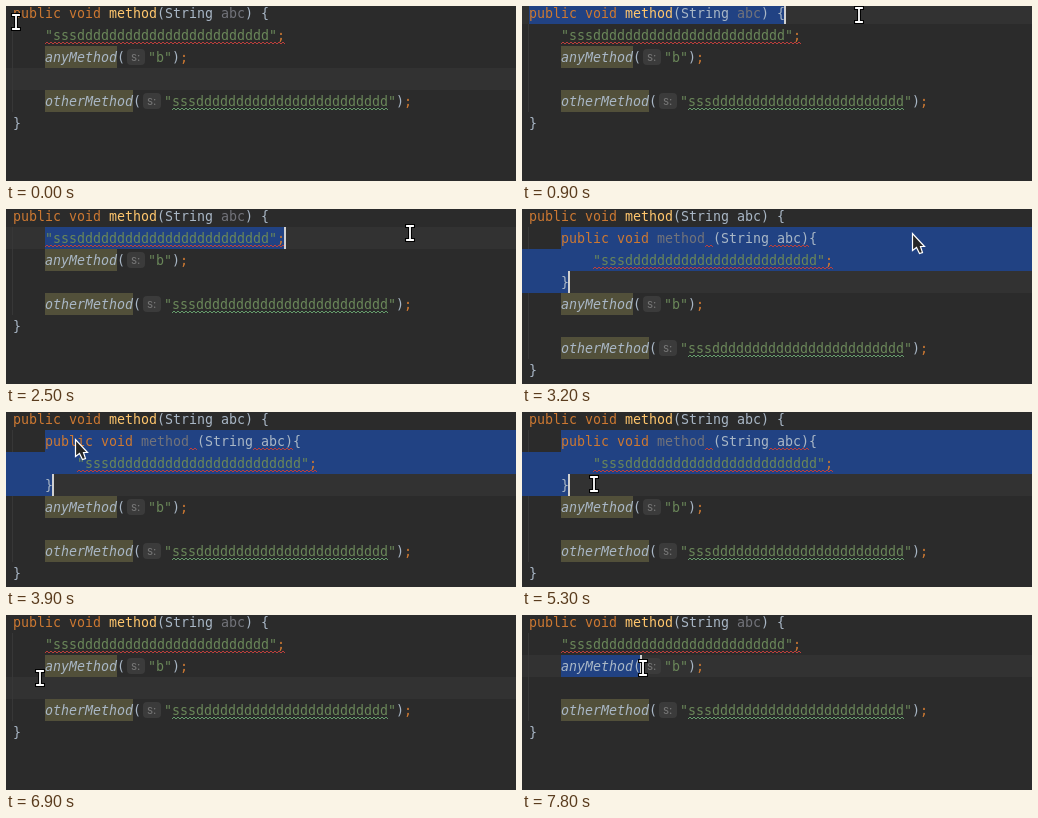
Write an HTML page with a canvas that moves like this. It is 510 by 175 pixels and loops after 8000 ms.

```html
<!DOCTYPE html>
<html lang="en">
<head>
<meta charset="utf-8">
<title>Editor selection</title>
<style>
html, body { margin: 0; width: 100%; height: 100%; overflow: hidden; background: #2b2b2b; }
canvas { display: block; }
</style>
</head>
<body>
<canvas id="stage" width="510" height="175"></canvas>
<script type="module">
const ctx = document.getElementById("stage").getContext("2d");
const W = 510, H = 175, LOOP = 8000, STEP = 100;
const ROW = 22, CH = 8, LEFT = 7, INDENT = 39;
const C = {
  bg: "#2b2b2b", line: "#323232", guide: "#373737", sel: "#214283", used: "#52503a",
  text: "#a9b7c6", key: "#cc7832", name: "#ffc66d", str: "#6a8759",
  dim: "#72737a", red: "#bc3f3c", typo: "#659c6b", pill: "#3b3b3b", hint: "#787878"
};
const STR = "sss" + "d".repeat(24);
const ARROW = new Path2D("M.5 .5v17l4-3 3 6 3-1-2-6h4z");
const BEAM = new Path2D("M-3 -7h6M0 -7v14M-3 7h6");

// Mouse moves: start, end, target x and y; it rests in between
const MOVES = [
  [100, 200, 5, 10], [300, 900, 337, 9], [900, 1200, 225, 27], [1200, 1800, 38, 27],
  [1900, 2500, 404, 24], [3100, 3900, 69, 27], [3900, 4400, 102, 45], [4400, 5000, 44, 72],
  [5100, 5500, 100, 72], [5800, 6700, 28, 78], [6700, 7100, 40, 48],
  [7100, 7400, 173, 53], [7400, 7700, 121, 53]
];

const rowTop = row => row * ROW - 4;
const clamp = (v, lo, hi) => Math.min(hi, Math.max(lo, v));
const snap = (x, from) => from + Math.round((x - from) / CH) * CH;

function mouseAt(t) {
  let x = 10, y = 16;
  for (const [start, end, toX, toY] of MOVES) {
    const p = clamp((t - start) / (end - start), 0, 1);
    const k = p * p * (3 - 2 * p);
    x += (toX - x) * k;
    y += (toY - y) * k;
  }
  return [x, y];
}

function fill(color, x0, x1, row) {
  ctx.fillStyle = color;
  ctx.fillRect(x0, rowTop(row), x1 - x0, ROW);
}

// Draws [text, colour] spans in a row and returns the x after the last one
function write(x, row, spans, style = "") {
  ctx.font = style + " 13.29px 'DejaVu Sans Mono', monospace";
  for (const [text, color] of spans) {
    ctx.fillStyle = color;
    ctx.fillText(text, x, rowTop(row) + 16);
    x += text.length * CH;
  }
  return x;
}

function wave(x0, x1, row, color) {
  const y = rowTop(row) + 19;
  ctx.beginPath();
  for (let x = x0, up = 1; x <= x1; x += 2, up = -up) ctx.lineTo(x, y + up);
  ctx.strokeStyle = color;
  ctx.lineWidth = 1;
  ctx.stroke();
}

function statement(x, row) {
  const end = write(x, row, [[`"${STR}"`, C.str], [";", C.key]]);
  wave(x, end, row, C.red);
}

// Draws a call with its parameter hint and returns the x of the argument
function call(method, arg, row) {
  const paren = INDENT + method.length * CH;
  write(INDENT, row, [[method, C.text]], "italic");
  const x = write(paren, row, [["(", C.text]]);
  ctx.fillStyle = C.pill;
  ctx.beginPath();
  ctx.roundRect(x + 2, rowTop(row) + 3, 18, 16, 4);
  ctx.fill();
  ctx.font = "11.5px Inter, sans-serif";
  ctx.fillStyle = C.hint;
  ctx.fillText("s:", x + 6, rowTop(row) + 15);
  write(x + 23, row, [[`"${arg}"`, C.str], [")", C.text], [";", C.key]]);
  return x + 23;
}

function pointer(x, y, isArrow) {
  ctx.save();
  ctx.translate(Math.round(x), Math.round(y));
  if (isArrow) {
    ctx.fillStyle = "#262626";
    ctx.fill(ARROW);
    ctx.strokeStyle = "#fff";
    ctx.lineWidth = 1.2;
    ctx.stroke(ARROW);
  } else {
    ctx.lineCap = "square";
    for (const [color, width] of [["#000", 4], ["#fff", 1.8]]) {
      ctx.strokeStyle = color;
      ctx.lineWidth = width;
      ctx.stroke(BEAM);
    }
  }
  ctx.restore();
}

// Row and span selected by dragging the mouse to x
function selection(t, x) {
  if (t < 400) return null;
  if (t < 2000) return [0, LEFT, t < 900 ? clamp(snap(x, LEFT), LEFT, 263) : 263];
  if (t < 3200) return [1, INDENT, clamp(snap(x, INDENT), INDENT, 279)];
  if (t < 7100) return null;
  return [2, INDENT, x < 142 ? clamp(snap(x, INDENT), INDENT, 119) : snap(x, 142)];
}

function draw(t) {
  const [mx, my] = mouseAt(t);
  const wrapped = t >= 3200 && t < 5900;
  const sel = selection(t, mx);
  const shift = wrapped ? 2 : 0;
  let caret = null;

  ctx.fillStyle = C.bg;
  ctx.fillRect(0, 0, W, H);
  fill(C.line, 0, W, sel ? sel[0] : 3);
  ctx.fillStyle = C.guide;
  ctx.fillRect(LEFT - 1, rowTop(1), 1, ROW * (4 + shift));
  fill(C.used, INDENT, 111, 2 + shift);
  fill(C.used, INDENT, 127, 4 + shift);

  if (wrapped) {
    fill(C.sel, INDENT, W, 1);
    fill(C.sel, 0, W, 2);
    fill(C.sel, 0, 47, 3);
    caret = [47, 3];
  } else if (sel) {
    const [row, x0, x1] = sel;
    fill(C.sel, x0, x1, row);
    caret = [x1, row];
  }

  write(LEFT, 0, [["public void ", C.key], ["method", C.name], ["(String ", C.text],
    ["abc", wrapped ? C.text : C.dim], [") {", C.text]]);
  if (wrapped) {
    write(INDENT, 1, [["public void ", C.key], ["method ", C.dim], ["(String abc){", C.text]]);
    wave(183, 191, 1, C.red);
    wave(247, 287, 1, C.red);
    statement(71, 2);
    write(INDENT, 3, [["}", C.text]]);
  } else {
    statement(INDENT, 1);
  }
  call("anyMethod", "b", 2 + shift);
  const arg = call("otherMethod", STR, 4 + shift) + CH;
  wave(arg, arg + STR.length * CH, 4 + shift, C.typo);
  write(LEFT, 5 + shift, [["}", C.text]]);

  if (caret) {
    ctx.fillStyle = "#d0d0d0";
    ctx.fillRect(caret[0] - 1, rowTop(caret[1]), 2, ROW);
  }
  const overBlock = wrapped && my >= 18 && (my < 62 || (my < 84 && mx < 47));
  pointer(mx, my, overBlock);
}

function tick(now) {
  draw(Math.floor(now % LOOP / STEP) * STEP);
  requestAnimationFrame(tick);
}
requestAnimationFrame(tick);
</script>
</body>
</html>
```
